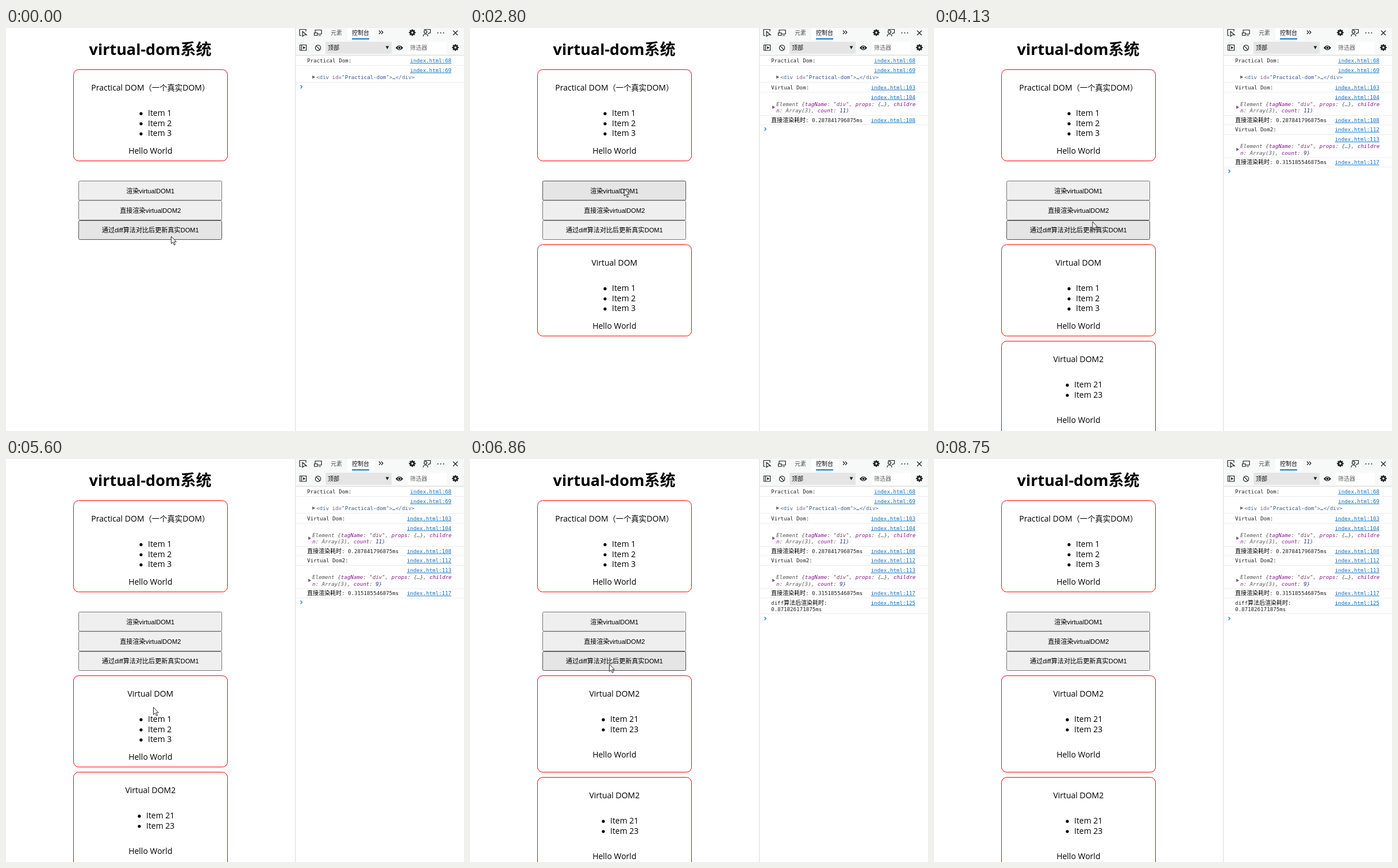
An HTML page for the animation above (9100 ms loop, 797x702 px).

```html
<!DOCTYPE html>
<html lang="zh-CN">
<head>
<meta charset="utf-8">
<title>virtual-dom</title>
<style>
  html, body { margin: 0; width: 100%; height: 100%; overflow: hidden; background: #fff; }
  svg { display: block; width: 797px; height: 702px; }
  text { font: 14px "Open Sans", "Noto Sans CJK SC", sans-serif; fill: #000; }
  .title { font-size: 27px; font-weight: 700; }
  .cjk { font-size: 13.33px; }
  .card rect { fill: none; stroke: #f00; }
  .mid { text-anchor: middle; }
  .btn { fill: #efefef; stroke: #767676; }
  .btn.hover { fill: #e5e5e5; stroke: #4f4f4f; }
  .btn.active { fill: #f5f5f5; stroke: #8d8d8d; }
  .label { font: 11.11px "Liberation Sans", "Noto Sans CJK SC", sans-serif; }
  .ui { font: 10px "Noto Sans CJK SC", sans-serif; }
  .log, .link { font: 9.17px "DejaVu Sans Mono", "Noto Sans CJK SC", monospace; fill: #222; }
  .link { fill: #0f70c0; text-anchor: end; text-decoration: underline; }
  .log.obj { font-style: oblique; fill: #555; }
  .zh { font-size: 10px; font-weight: 500; fill: #000; }
  .key { fill: #881391; } .num { fill: #1c2c9c; } .str { fill: #7a3b62; }
  .tag { fill: #4a6c9c; } .attr { fill: #7d5a86; } .val { fill: #32509a; }
  .icon { fill: none; stroke: #222; stroke-width: 1.2; }
</style>
</head>
<body>
<svg id="stage" viewBox="0 0 797 702"></svg>
<script>
const stage = document.getElementById('stage');
const LOOP = 9100, STEP = 70;
const RENDER_1 = 1050, RENDER_2 = 3430, DIFF = 6790, EXIT = 8750;

const text = (x, y, cls, content) => `<text x="${x}" y="${y}" class="${cls}">${content}</text>`;
const rect = (x, y, w, h, fill) => `<rect x="${x}" y="${y}" width="${w}" height="${h}" fill="${fill}"/>`;
const icon = (d, extra = '') => `<path class="icon" d="${d}" ${extra}/>`;
const span = (cls, content) => `<tspan class="${cls}">${content}</tspan>`;

// Shows its content only from one time up to another.
const during = (from, to, content) => `<g data-from="${from}" data-to="${to}">${content}</g>`;

function card(top, heading, items, height, helloAt) {
  const left = items[0].length > 6 ? 244 : 247;
  const list = items.map((item, i) => {
    const y = top + 81.2 + i * 17.6;
    return `<circle cx="${left - 12}" cy="${y - 4}" r="2.6"/>` + text(left, y, '', item);
  }).join('');
  return `<g class="card"><rect x="117.5" y="${top + .5}" width="268" height="${height}" rx="9"/>` +
    text(251.3, top + 37, 'mid', heading) + list + text(251.3, top + helloAt, 'mid', 'Hello World') + '</g>';
}
const firstCard = (top, heading) => card(top, heading, ['Item 1', 'Item 2', 'Item 3'], 159, 147);
const secondCard = top => card(top, 'Virtual DOM2', ['Item 21', 'Item 23'], 168, 143);

const buttons = [
  { y: 266.5, h: 33.5, base: 288, label: '渲染virtualDOM1' },
  { y: 300.5, h: 34, base: 322, label: '直接渲染virtualDOM2' },
  { y: 335.5, h: 33, base: 356, label: '通过diff算法对比后更新真实DOM1' }
];
const button = b => `<rect class="btn" x="126.5" y="${b.y}" width="249" height="${b.h}" rx="2"/>` +
  text(251.3, b.base, 'mid label', b.label);

function gear(cx, cy) {
  const teeth = [0, 45, 90, 135].map(a =>
    `<path d="M-5.8 0H5.8" stroke="#222" stroke-width="2.4" transform="rotate(${a})"/>`).join('');
  return `<g transform="translate(${cx} ${cy})">${teeth}<circle r="4.4" fill="#222"/><circle r="1.7" fill="#fff"/></g>`;
}

const link = (y, line) => text(775, y, 'link', 'index.html:' + line);
const rule = y => rect(504, y, 293, 1, '#ececec');
const arrow = (x, y) => `<path d="M${x} ${y - 3}l5 3l-5 3z" fill="#6b6b6b"/>`;
const prompt = y => icon(`M512.5 ${y - 2.7}l2.8 2.7l-2.8 2.7`, 'style="stroke:#1a73c8"');

function renderLog(y, name, lines, count, ms) {
  const key = k => span('key', k);
  return text(524, y + 3.2, 'log', name) + link(y + 3.2, lines[0]) + rule(y + 8) +
    link(y + 20, lines[1]) + arrow(526, y + 34.5) +
    text(533, y + 32, 'log obj', `Element {${key('tagName')}: ${span('str', '"div"')}, ${key('props')}: {…}, ${key('childre')}`) +
    text(533, y + 43.5, 'log obj', `${key('n')}: Array(3), ${key('count')}: ${span('num', count)}}`) + rule(y + 48.5) +
    text(524, y + 60.2, 'log', `${span('zh', '直接渲染耗时')}: ${ms}ms`) + link(y + 60.2, lines[2]) + rule(y + 64.5);
}

const toolbar =
  rect(504, 0, 293, 47, '#f7f8f8') + rect(594, 0, 47, 21, '#fff') + rect(602, 18, 30, 2, '#0078d4') +
  rect(504, 47, 293, 1, '#d8d8d8') + rect(556, 24, 115, 21, '#e5e5e5') + rect(699, 24, 68, 21, '#fff') +
  text(565, 12, 'ui" fill-opacity=".68', '元素') + text(602, 12, 'ui', '控制台') +
  text(560, 38, 'ui', '顶部') + text(703, 38, 'ui" fill-opacity=".6', '筛选器') +
  icon('M514 13H511V2.5H522V6M516 6l7 6h-4l-3 2.5z') +
  icon('M538 8V3.5H549V10.5H543M536.5 8.5h5.5v4.5h-5.5zM544 13h4') +
  icon('M649 4.5l3 3l-3 3M653 4.5l3 3l-3 3') +
  gear(707, 8) + gear(782, 34) +
  icon('M728 3.5V2.5H738.5V8.5H736.5L734.5 10.5M726 14.5q0-4 4-4t4 4') +
  '<circle class="icon" cx="730" cy="6.5" r="2.5"/>' +
  [751.5, 756.5, 761.5].map(x => `<circle cx="${x}" cy="8.5" r="1" fill="#222"/>`).join('') +
  icon('M778 4.5l8 8M786 4.5l-8 8', 'stroke-width="1.4"') +
  icon('M511.5 29.5h11v9.5h-11zM514.5 29.5v9.5') + '<path d="M517 31.8l4 2.5l-4 2.5z" fill="#222"/>' +
  '<circle class="icon" cx="543" cy="34.5" r="4.7"/>' + icon('M539.7 31.2l6.6 6.6') +
  '<path d="M660.5 31.5h6l-3 5.5z" fill="#222"/>' +
  '<path d="M678 34.5q6.5-8 13 0q-6.5 8-13 0z" fill="#222"/><circle cx="684.5" cy="34.5" r="2.5" fill="#222" stroke="#fff"/>';

const firstLogs =
  text(524, 60.2, 'log', 'Practical Dom:') + link(60.2, 68) + rule(65) + link(76.7, 69) + arrow(533, 85.5) +
  text(540, 89.2, 'log', span('tag', '&lt;div ') + span('attr', 'id') + span('tag', '="') +
    span('val', 'Practical-dom') + span('tag', '"&gt;') + '…' + span('tag', '&lt;/div&gt;')) + rule(94);

const diffLog = text(524, 253.7, 'log', `diff${span('zh', '算法后渲染耗时')}:`) + link(253.7, 125) +
  text(524, 265.2, 'log', '0.871826171875ms') + rule(269);

stage.innerHTML =
  text(251, 47, 'mid title', 'virtual-dom系统') +
  firstCard(72, `Practical DOM${span('cjk', '（一个真实')}DOM${span('cjk', '）')}`) +
  buttons.map(button).join('') +
  during(RENDER_1, DIFF, firstCard(377, 'Virtual DOM')) +
  during(RENDER_2, DIFF, secondCard(545)) +
  during(DIFF, LOOP, secondCard(377) + secondCard(554)) +
  toolbar + firstLogs +
  during(0, RENDER_1, prompt(102.5)) +
  during(RENDER_1, LOOP, renderLog(103.5, 'Virtual Dom:', [103, 104, 108], 11, '0.287841796875')) +
  during(RENDER_1, RENDER_2, prompt(176)) +
  during(RENDER_2, LOOP, renderLog(177, 'Virtual Dom2:', [112, 113, 117], 9, '0.315185546875')) +
  during(RENDER_2, DIFF, prompt(249.5)) +
  during(DIFF, LOOP, diffLog + prompt(278)) +
  rect(503, 0, 1, 702, '#dcdcdc') +
  during(0, EXIT, '<path id="cursor" d="M.5.5V13.2L3.4 10.5L5.6 15.4L7.6 14.5L5.5 9.8H9.4z" fill="#fff" stroke="#111" stroke-width=".9"/>');

// Pointer path: time, x, y of the tip.
const path = [
  [0, 287, 362.5], [70, 287, 362.5], [350, 273, 270], [630, 273, 270], [770, 268.5, 274.5],
  [2730, 268.5, 274.5], [3220, 264, 309], [3920, 264, 309], [4130, 275.5, 337],
  [4620, 275.5, 337], [5180, 258, 440], [5320, 258, 440], [5600, 256, 432],
  [6020, 242, 357], [7700, 242, 357], [8120, 382, 479], [8680, 744, 699], [LOOP, 744, 699]
];
const presses = [[910, RENDER_1], [3360, RENDER_2], [6720, DIFF]];

function pointerAt(t) {
  const i = path.findIndex(p => p[0] > t);
  const [t0, x0, y0] = path[i - 1], [t1, x1, y1] = path[i];
  const k = (t - t0) / (t1 - t0);
  return [x0 + (x1 - x0) * k, y0 + (y1 - y0) * k];
}

const cursor = document.getElementById('cursor');
const buttonRects = [...stage.querySelectorAll('.btn')];
const timed = [...stage.querySelectorAll('[data-from]')];

function draw(t) {
  const [x, y] = pointerAt(t);
  cursor.setAttribute('transform', `translate(${x} ${y})`);
  buttonRects.forEach((el, i) => {
    const { y: top, h } = buttons[i];
    const over = x > 126 && x < 376 && y >= top && y < top + h;
    const pressed = t >= presses[i][0] && t < presses[i][1];
    el.classList.toggle('hover', over);
    el.classList.toggle('active', pressed);
  });
  for (const el of timed) {
    const shown = t >= +el.dataset.from && t < +el.dataset.to;
    el.style.display = shown ? '' : 'none';
  }
}

const start = performance.now();
function tick() {
  const t = (performance.now() - start) % LOOP;
  draw(Math.floor(t / STEP) * STEP);
  requestAnimationFrame(tick);
}
tick();
</script>
</body>
</html>
```
